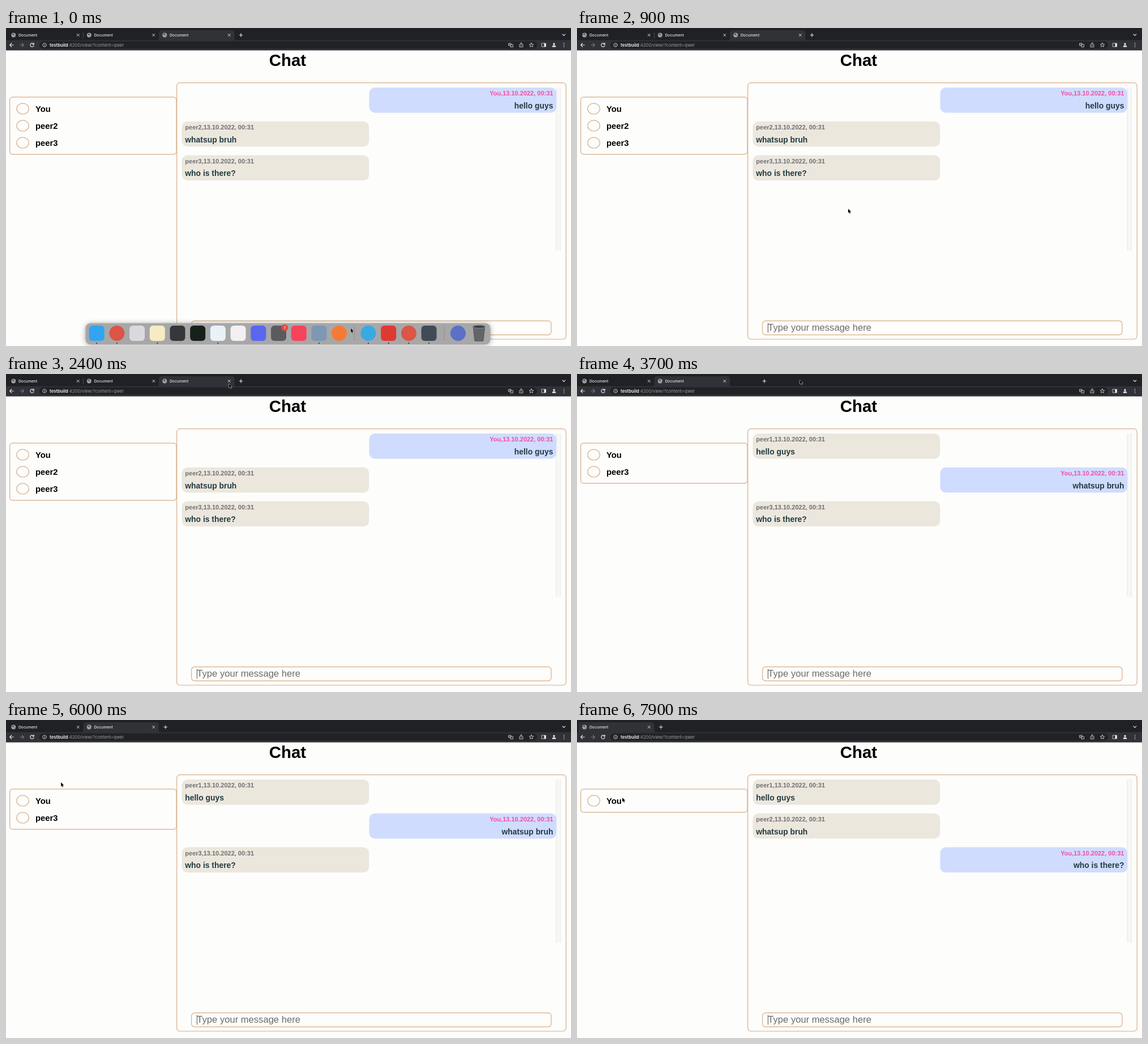
These frames come from a looping animation (998x561 px, 8000 ms). An HTML page:

```html
<!DOCTYPE html>
<html lang="en">
<head>
<meta charset="utf-8">
<title>Chat</title>
<style>
  html, body { margin: 0; width: 100%; height: 100%; overflow: hidden; background: #fdfdfc; }
  svg { display: block; width: 998px; height: 561px; }
  text { font-family: "Liberation Sans", Arial, sans-serif; }
  .ui { font-family: Inter, sans-serif; font-size: 6.75px; font-weight: 500; fill: #e6e7e9; }
  .url { font-size: 7.7px; font-weight: 400; fill: #9a9da1; }
  .url tspan { font-weight: 600; fill: #f0f1f2; }
  .title { font-size: 29.4px; font-weight: 700; text-anchor: middle; }
  .user { font-size: 14.8px; font-weight: 700; }
  .meta { font-size: 11px; font-weight: 700; fill: #706f74; }
  .msg { font-size: 13.9px; font-weight: 700; fill: #223b42; }
  .mine { text-anchor: end; }
  .meta.mine { fill: #f64ba6; }
  .hint { font-size: 16.6px; fill: #6b6b6b; }
  .line { fill: none; stroke: #d6ae86; stroke-width: 1.2; }
  .icon { fill: none; stroke: #dfe1e3; stroke-width: 1.2; stroke-linecap: round; stroke-linejoin: round; }
  .dim { stroke: #75777b; }
  .shelf { fill: #a7a7a8; filter: drop-shadow(0 1px 5px rgba(0, 0, 0, .35)); }

  .view, .hover, #arrow, #beam { animation: 8s step-end infinite; }
  #view0 { animation-name: view0; }
  #view1 { animation-name: view1; }
  #view2 { animation-name: view2; }
  #hover0 { animation-name: hover0; }
  #hover1 { animation-name: hover1; }
  #arrow { animation-name: arrow; }
  #beam { animation-name: beam; }
  #plus { animation: plus 8s linear infinite; }
  #dock { animation: dock 8s linear infinite; }
  #pointer { animation: pointer 8s linear infinite; }

  @keyframes view0 { 0% { visibility: visible } 45%, 100% { visibility: hidden } }
  @keyframes view1 { 0% { visibility: hidden } 45% { visibility: visible } 88.75%, 100% { visibility: hidden } }
  @keyframes view2 { 0% { visibility: hidden } 88.75%, 100% { visibility: visible } }
  @keyframes hover0 { 0% { visibility: hidden } 32.5% { visibility: visible } 45%, 100% { visibility: hidden } }
  @keyframes hover1 { 0% { visibility: hidden } 86.25% { visibility: visible } 88.75%, 100% { visibility: hidden } }
  @keyframes arrow { 0% { visibility: visible } 55% { visibility: hidden } 60%, 100% { visibility: visible } }
  @keyframes beam { 0% { visibility: hidden } 55% { visibility: visible } 60%, 100% { visibility: hidden } }
  @keyframes plus {
    0%, 45% { transform: translateX(415px) }
    47%, 88.75% { transform: translateX(281.7px) }
    90.75%, 100% { transform: translateX(148.3px) }
  }
  @keyframes dock {
    0%, 2.5% { transform: none; animation-timing-function: ease-in-out }
    7.5%, 100% { transform: translateY(60px) }
  }
  @keyframes pointer {
    0% { transform: translate(609px, 530px) }
    3.75% { transform: translate(575px, 470px) }
    8.75% { transform: translate(490px, 340px) }
    11.25%, 13.75% { transform: translate(479px, 319px) }
    20% { transform: translate(455px, 220px) }
    26.25% { transform: translate(405px, 60px) }
    30% { transform: translate(394px, 17px) }
    33.75%, 38.75% { transform: translate(394px, 12px) }
    41.25%, 46% { transform: translate(394px, 10px) }
    57.5% { transform: translate(378px, 25px) }
    65% { transform: translate(190px, 115px) }
    70% { transform: translate(105px, 145px) }
    75%, 77.5% { transform: translate(97px, 110px) }
    83.75% { transform: translate(220px, 30px) }
    87.5%, 89% { transform: translate(261px, 9px) }
    93.75% { transform: translate(165px, 80px) }
    98.75%, 100% { transform: translate(80px, 137px) }
  }
</style>
</head>
<body>
<svg viewBox="0 0 998 561">
  <rect width="998" height="561" fill="#fdfdfc"/>

  <g id="browser">
    <rect width="998" height="22" fill="#1f2124"/>
    <rect y="21.5" width="998" height="18" fill="#303237"/>
    <rect x="59" y="23.5" width="879" height="13" rx="6.5" fill="#202225"/>
    <path class="icon" d="M13.3 30H7M9.7 27L6.7 30l3 3"/>
    <path class="icon dim" d="M24.7 30H31M28.3 27l3 3-3 3"/>
    <path class="icon" d="M48.8 28.4a3.2 3.2 0 1 0 .3 2.6M49.2 26.6v2.2H47"/>
    <g class="icon" style="stroke-width:.8">
      <circle cx="68" cy="30" r="3.3"/>
      <path d="M68 29.8v1.8M68 28.3v.1"/>
      <path d="M888 27h4v4h-4zM892 29h3.5v4.5H891v-2.5M889 29h2"/>
      <path d="M908.2 29H907v4.5h6V29h-1.2M910 31.5V26M908.4 27.5l1.6-1.6 1.6 1.6"/>
      <path d="M928 26.2l1.1 2.5 2.7.2-2.1 1.8.7 2.7-2.4-1.5-2.4 1.5.7-2.7-2.1-1.8 2.7-.2z"/>
      <path d="M946.5 27h7v6h-7z"/>
      <path d="M983 11l2.4 2.4 2.4-2.4" style="stroke-width:1.1"/>
    </g>
    <g fill="#eceded">
      <path d="M950.5 27h3v6h-3z"/>
      <circle cx="968" cy="28.2" r="1.7"/>
      <path d="M964.7 33.4q0-2.8 3.3-2.8t3.3 2.8z"/>
      <circle cx="985.5" cy="27" r=".8"/><circle cx="985.5" cy="30" r=".8"/><circle cx="985.5" cy="33" r=".8"/>
    </g>
    <text class="ui url" x="77" y="32.7"><tspan>testbuild</tspan>:4200/view/?content=qwer</text>
  </g>

  <text class="title" x="497.5" y="67.3">Chat</text>
  <rect class="line" x="301.7" y="96.7" width="687.5" height="452.3" rx="5.5"/>
  <rect x="971.5" y="105" width="8.5" height="288" fill="#f7f7f6"/>
  <path d="M972 105v288M979.5 105v288" stroke="#e9e9e8"/>
  <rect class="line" x="327.6" y="516.6" width="635.4" height="24.8" rx="5.5"/>
  <text class="hint" x="337.3" y="534.4">Type your message here</text>
  <path d="M337.4 520.5v17" stroke="#555"/>

  <g id="views"></g>
  <path id="plus" class="icon" d="M-2.8 12.5h5.6M0 9.7v5.6"/>

  <g id="dock">
    <rect class="shelf" x="140.5" y="520.7" width="715" height="37.6" rx="9"/>
    <path d="M615.5 526v26M774 526v26" stroke="#88888a" stroke-width=".8"/>
    <g id="apps"></g>
    <path d="M824.5 526h22l-2.6 25q-.3 2-2 2h-12.8q-1.7 0-2-2z" fill="#626566"/>
    <ellipse cx="835.5" cy="527" rx="11" ry="2.7" fill="#3d4041" stroke="#8b8e8f"/>
    <circle cx="492.3" cy="528.7" r="6" fill="#e9473f"/>
    <text class="ui" x="492.3" y="531.2" text-anchor="middle" style="fill:#fff">1</text>
  </g>

  <g id="pointer">
    <path id="arrow" d="M0 0v7.3l1.7-1.5 1.2 2.7 1.3-.6-1.2-2.6h2.3z" fill="#000" stroke="#fff" paint-order="stroke"/>
    <g id="beam" fill="none">
      <path d="M-2.3-4.5Q0-4.5 0-3V3Q0 4.5-2.3 4.5M2.3-4.5Q0-4.5 0-3V3Q0 4.5 2.3 4.5" stroke="#fff" stroke-width="1.7"/>
      <path d="M-2.3-4.5Q0-4.5 0-3V3Q0 4.5-2.3 4.5M2.3-4.5Q0-4.5 0-3V3Q0 4.5 2.3 4.5" stroke="#333" stroke-width=".7"/>
    </g>
  </g>
</svg>
<script>
  const names = ['peer1', 'peer2', 'peer3'];
  const messages = ['hello guys', 'whatsup bruh', 'who is there?'];
  const date = '13.10.2022, 00:31';
  const range = n => [...Array(n).keys()];

  function tab(i, active, view) {
    const x = 3 + 133.5 * i;
    const shape = active
      ? `<path d="M${x - 3} 22q3 0 3-3V9q0-5 5-5h123.5q5 0 5 5v10q0 3 3 3z" fill="#303237"/>` : '';
    const hover = active && view < 2
      ? `<circle class="hover" id="hover${view}" cx="${x + 124.3}" cy="12.5" r="4.5" fill="#5b5d61"/>` : '';
    return `${shape}${hover}
      <circle cx="${x + 10.3}" cy="12.5" r="3.9" fill="#a5a8ac"/>
      <path d="M${x + 7.5} 11.5q2-2.5 3.5-1.5t-1.5 2.5zM${x + 10.5} 15.2q.3-2.5 3-2.2" fill="#3b3d41"/>
      <text class="ui" x="${x + 19}" y="15">Document</text>
      <path class="icon" style="stroke-width:1" d="M${x + 122.3} 10.5l4 4m0-4l-4 4"/>`;
  }

  function user(name, i) {
    const y = 142.4 + 30 * i;
    return `<ellipse class="line" cx="29.6" cy="${y}" rx="10.7" ry="9.6"/>
      <text class="user" x="52" y="${y + 5.3}">${name}</text>`;
  }

  function bubble(i, own) {
    const y = 105 + 59.8 * i;
    const x = own ? 966.5 : 316.3;
    const side = own ? ' mine' : '';
    return `<rect x="${own ? 641.5 : 310.5}" y="${y}" width="330.8" height="44.5" rx="10" fill="${own ? '#d0dcfd' : '#ece7dd'}"/>
      <text class="meta${side}" x="${x}" y="${y + 14.2}">${own ? 'You' : names[i]},${date}</text>
      <text class="msg${side}" x="${x}" y="${y + 36.8}">${messages[i]}</text>`;
  }

  // Each view is one browser tab; closing it reveals the tab of the next person.
  function view(me) {
    const active = 2 - me;
    const people = ['You', ...names.slice(me + 1)];
    return `<g class="view" id="view${me}">
      ${me ? '' : '<path d="M136.5 8v10" stroke="#55575b" stroke-width=".8"/>'}
      ${range(active + 1).map(i => tab(i, i === active, me)).join('')}
      <rect class="line" x="6.6" y="121.9" width="294.4" height="${11 + 30 * people.length}" rx="5"/>
      ${people.map(user).join('')}
      ${range(3).map(i => bubble(i, i === me)).join('')}</g>`;
  }

  // Colour, then "o" for a round icon and "." for a running app.
  const apps = `#32a4f0. #dc5547o. #d9dade #f6ecc4. #36373b #17211b #eaf1f7. #f3eff2 #5967ee #5a5b5e
    #f6435b #7e97b2. #f47b35o | #39a9e4o. #df3933. #dc5547o. #414a55. | #5c70c6o`.split(/\s+/);
  let center = 160.2;
  function app(spec) {
    if (spec === '|') { center += 15.7; return ''; }
    const x = center;
    center += 35.7;
    return `<rect x="${x - 13.5}" y="525" width="27" height="27" rx="${spec.includes('o') ? 13.5 : 6}" fill="${spec.slice(0, 7)}"/>`
      + (spec.includes('.') ? `<circle cx="${x}" cy="556" r="1.1" fill="#2c2c2d"/>` : '');
  }

  document.getElementById('views').innerHTML = range(3).map(view).join('');
  document.getElementById('apps').innerHTML = apps.map(app).join('');
</script>
</body>
</html>
```
